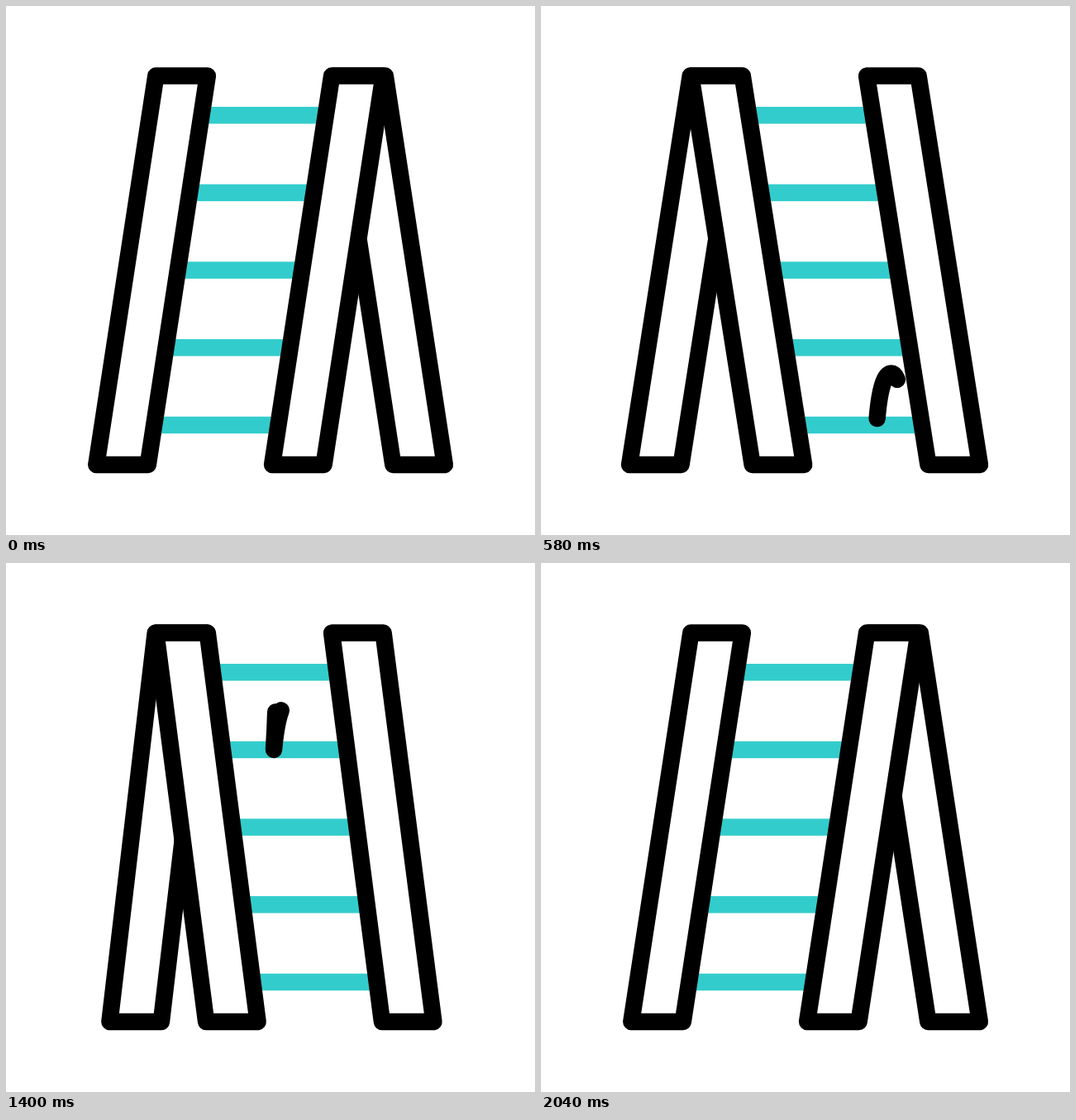
An HTML page with a canvas that plays this animation: 640x640 px, repeating every 2.4 s.

```html
<!DOCTYPE html>
<html lang="en">
<head>
<meta charset="utf-8">
<title>Step ladder</title>
<style>
html, body { margin: 0; width: 100%; height: 100%; overflow: hidden; background: #fff; }
canvas { display: block; width: 640px; height: 640px; }
</style>
</head>
<body>
<canvas id="stage" width="640" height="640"></canvas>
<script>
const ctx = document.getElementById('stage').getContext('2d');
const LOOP = 2400, STEP = 20;
const TOP = 84.6, BOTTOM = 555, RAIL = 62.5, WEIGHT = 20.5;
const LEFT = 181.3, RIGHT = 394.1, BACK_LEFT = 180.7, BACK_RIGHT = 396.3;
const RUNGS = 5, HOP = 62.5, TRAIL = 1086;

const rungY = i => 132.2 + 93.7 * i;
const mix = (a, b, u) => a + (b - a) * u;
const smooth = u => u * u * (3 - 2 * u);
const progress = (t, start, span) => Math.min(1, Math.max(0, (t - start) / span));

// Swing from home to peak, settle slowly to rest, swing home again.
function sway(t, home, peak, rest, swing) {
  const open = mix(home, peak, smooth(progress(t, 0, swing)));
  const settle = (rest - peak) * progress(t, swing, 1480 - swing);
  return mix(open + settle, home, smooth(progress(t, 1480, 560)));
}

// Distance along the trail, with part of the pace eased.
function along(t, start, span, ease) {
  const u = progress(t, start, span);
  return TRAIL * mix(u, smooth(u), ease);
}

// One hop per rung, climbing from right to left.
function hopPath() {
  const path = new Path2D();
  const feet = [406, 369, 349, 324, 303], peaks = [424, 393, 358, 347, 315];
  let x = 438, y = 570;
  path.moveTo(x, y);
  for (let i = 0; i < RUNGS; i++) {
    const footX = feet[i], footY = rungY(RUNGS - 1 - i);
    const px = peaks[i], py = Math.max(TOP, footY - HOP);
    const w = px - footX, h = footY - py;
    path.bezierCurveTo(x + 6, mix(y, py, 0.65), px + 10, py, px, py);
    path.bezierCurveTo(px - 0.38 * w, py, footX + 0.2 * w, py + 0.18 * h, footX, footY);
    x = footX;
    y = footY;
  }
  return path;
}
const trail = hopPath();

function rail(x, shift) {
  ctx.beginPath();
  ctx.moveTo(x, TOP);
  ctx.lineTo(x + RAIL, TOP);
  ctx.lineTo(x + RAIL + shift, BOTTOM);
  ctx.lineTo(x + shift, BOTTOM);
  ctx.closePath();
  ctx.fill();
  ctx.stroke();
}

function drawRungs(shift) {
  ctx.fillStyle = '#33cccc';
  for (let i = 0; i < RUNGS; i++) {
    const y = rungY(i);
    const dx = shift * (y - TOP) / (BOTTOM - TOP);
    ctx.fillRect(LEFT + RAIL + dx, y - WEIGHT / 2, RIGHT - LEFT - RAIL, WEIGHT);
  }
}

function drawTrail(t) {
  const head = along(t, 332, 1280, 0.2), tail = along(t, 373, 1410, 0.42);
  if (head === 0 || tail === TRAIL) return;
  ctx.setLineDash([head - tail, 2 * TRAIL]);
  ctx.lineDashOffset = -tail;
  ctx.stroke(trail);
  ctx.setLineDash([]);
}

function draw(t) {
  const front = sway(t, -72, 76.5, 59.5, 450);
  const back = sway(t, 72, -77, -53.5, 430);
  ctx.fillStyle = '#fff';
  ctx.fillRect(0, 0, 640, 640);
  ctx.strokeStyle = '#000';
  ctx.lineWidth = WEIGHT;
  ctx.lineCap = ctx.lineJoin = 'round';

  // The rear leg changes sides while it is folded behind the front.
  rail(back > 0 ? BACK_RIGHT : BACK_LEFT, back);
  drawRungs(front);
  ctx.fillStyle = '#fff';
  rail(LEFT, front);
  rail(RIGHT, front);
  drawTrail(t);
}

const start = performance.now();
function tick(now) {
  const t = Math.max(0, now - start) % LOOP;
  draw(Math.floor(t / STEP) * STEP);
  requestAnimationFrame(tick);
}
draw(0);
requestAnimationFrame(tick);
</script>
</body>
</html>
```
